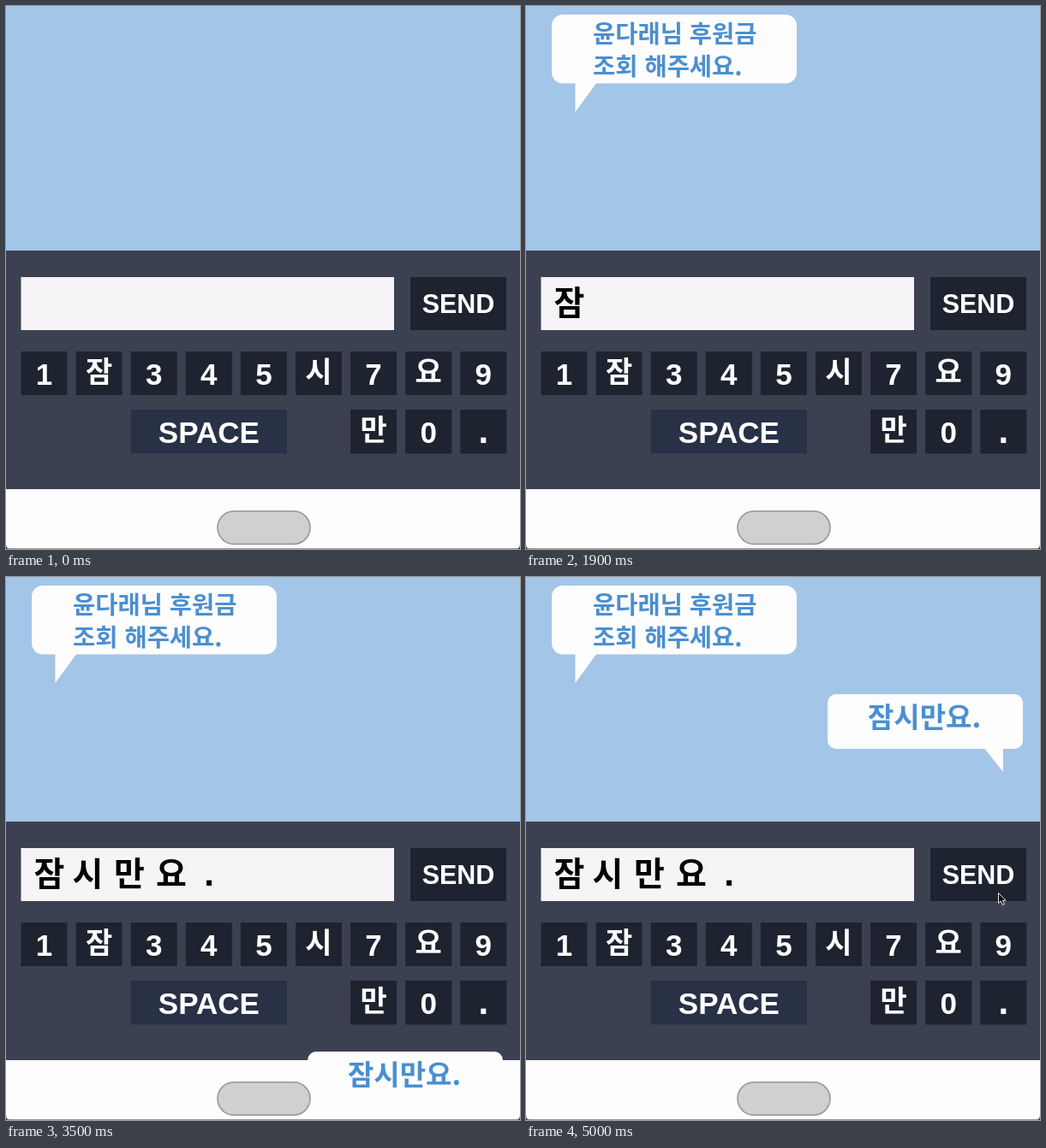
These frames come from a looping animation (600 px wide and 635 px high, 5100 ms). An HTML page:

```html
<!DOCTYPE html>
<html lang="ko">
<head>
<meta charset="utf-8">
<title>Chat keyboard</title>
<style>
  html, body { margin: 0; width: 100%; height: 100%; overflow: hidden; background: #fefdfe; }
  svg { display: block; width: 100%; height: 100%; }
  text { font-family: "Noto Sans CJK KR", "Noto Sans CJK", sans-serif; font-weight: 700; }
  .latin { font-family: "Liberation Sans", Arial, sans-serif; }
  .mid { text-anchor: middle; }
  #keys text { fill: #fff; }
  .bubble rect, .bubble path { fill: #fefdfe; }
  .bubble text { fill: #4b8fd0; }
</style>
</head>
<body>
<svg viewBox="0 0 600 635" preserveAspectRatio="none">
  <rect width="600" height="635" fill="#fefdfe"/>
  <rect width="600" height="286" fill="#a3c5e8"/>
  <rect y="286" width="600" height="279" fill="#3c4152"/>
  <rect x="17.5" y="317" width="435.5" height="62" fill="#f6f4f7"/>
  <g id="keys"></g>
  <g id="typed"></g>
  <g id="ask" class="bubble">
    <rect x="30" width="286" height="80.5" rx="13"/>
    <path d="M57.5 79V114L83 79Z"/>
    <text x="78" y="33" font-size="28.5">윤다래님 후원금</text>
    <text x="78" y="71" font-size="28.5">조회 해주세요.</text>
  </g>
  <g id="reply" class="bubble">
    <rect x="352" width="228" height="64" rx="10"/>
    <path d="M534 62L557 91V62Z"/>
    <text x="399" y="38.5" font-size="33">잠시만요.</text>
  </g>
  <rect x="247" y="590.8" width="108" height="38.5" rx="19.2" fill="#d1cfd2" stroke="#98969a" stroke-width="1.6"/>
  <path d="M0 634.5H600" stroke="#9a9a9c"/>
  <path d="M0 629Q0 635 5 635H0ZM600 629Q600 635 595 635H600Z" fill="#444"/>
  <path id="cursor" d="M0 0V12L2.8 9.5L4.8 14L7 13L5 8.7H8.6Z" fill="#111" stroke="#e8e8ea" stroke-width="1"/>
</svg>
<script>
const LOOP = 5100, STEP = 100;
const KEY = '#1d232f', PRESSED = '#4c566c';
const $ = id => document.getElementById(id);
const keys = {}, typed = [];

function add(parent, tag, attrs, text = '') {
  const el = document.createElementNS('http://www.w3.org/2000/svg', tag);
  for (const k in attrs) el.setAttribute(k, attrs[k]);
  el.textContent = text;
  parent.append(el);
  return el;
}

function addKey(label, x, y, w = 54, h = 51, size = 35, fill = KEY) {
  const hangul = label > '가';
  const box = add($('keys'), 'rect', { x, y, width: w, height: h, fill });
  add($('keys'), 'text', {
    class: hangul ? 'mid' : 'mid latin',
    x: x + w / 2,
    y: y + (hangul ? 35.5 : 39),
    'font-size': hangul ? 34 : label === '.' ? 42 : size
  }, label);
  keys[label] = box;
}

const column = i => 17.5 + i * 64.1;
[...'1잠345시7요9'].forEach((c, i) => addKey(c, column(i), 404));
[...'만0.'].forEach((c, i) => addKey(c, column(6 + i), 472, 54, 51.5));
addKey('SPACE', 145.7, 472, 182.3, 51.5, 35, '#293147');
addKey('SEND', 472, 317, 112, 62, 30.5);
$('keys').lastChild.setAttribute('y', 359);

// [label, x of typed character, time typed, time key lights up]
const strokes = [
  ['잠', 50.5, 1900, 2000],
  ['시', 95.5, 2100, 2200],
  ['만', 144, 2400, 2500],
  ['요', 193, 2700, 2800],
  ['.', 237, 2900, 3000],
  ['SEND', 0, 0, 3200]
];
for (const [label, x, at] of strokes) {
  if (!x) continue;
  const dot = label === '.';
  const el = add($('typed'), 'text', {
    class: dot ? 'mid latin' : 'mid', x, y: 360.5, 'font-size': dot ? 42 : 39
  }, label);
  typed.push({ el, at });
}

const show = (el, on) => el.setAttribute('visibility', on ? 'visible' : 'hidden');
const clamp = u => Math.max(0, Math.min(1, u));

// Rises with a quadratic ease-out over half a second.
function rise(el, t, start, end, travel) {
  const left = 1 - clamp((t - start) / 500);
  show(el, t >= start);
  el.setAttribute('transform', `translate(0 ${end + travel * left * left})`);
}

function draw(time) {
  const t = Math.floor((time % LOOP) / STEP) * STEP;
  rise($('ask'), t, 500, 10, 580.5);
  rise($('reply'), t, 3500, 137, 418);
  for (const c of typed) show(c.el, t >= c.at);
  for (const [label, , , at] of strokes) {
    keys[label].setAttribute('fill', t >= at && t < at + STEP ? PRESSED : KEY);
  }
  const left = 1 - clamp((t - 4700) / 300);
  show($('cursor'), t >= 4700);
  $('cursor').setAttribute('transform', `translate(${551.5 + 34 * left * left} ${369.5 - 2 * left})`);
}

const begin = performance.now();
function tick(now) {
  draw(Math.max(0, now - begin));
  requestAnimationFrame(tick);
}
draw(0);
requestAnimationFrame(tick);
</script>
</body>
</html>
```
